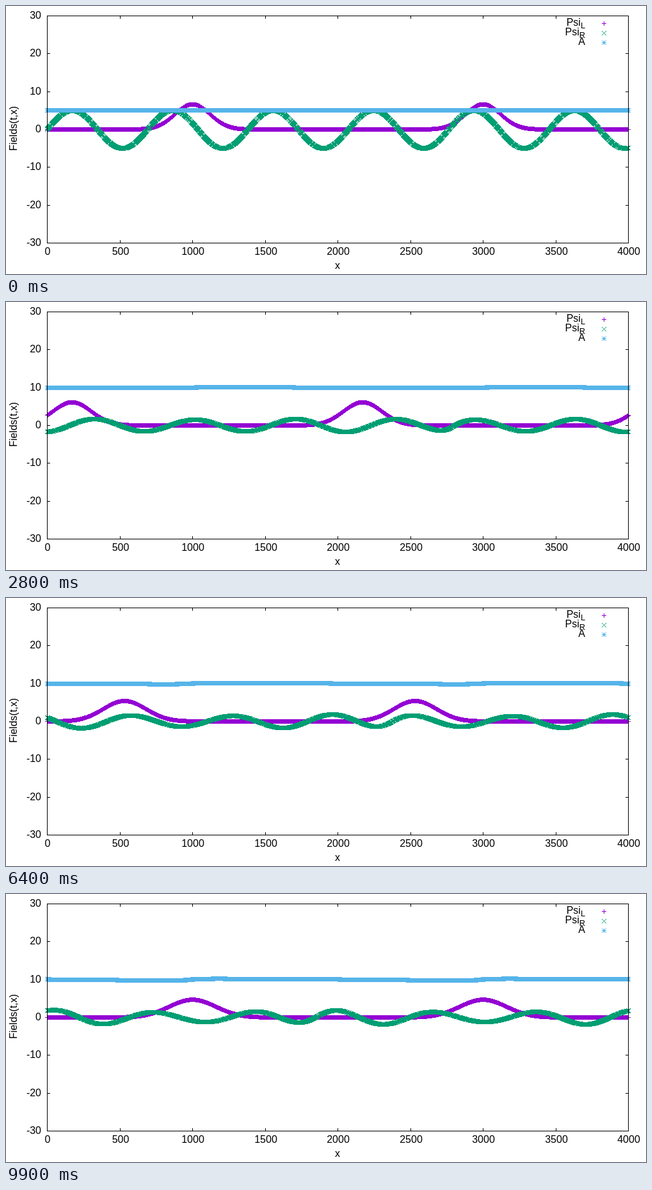
Recreate the animation shown at these times as an HTML page with a canvas. Size 1000 by 420 pixels, loop 10000 ms.

```html
<!DOCTYPE html>
<html lang="en">
<head>
<meta charset="utf-8">
<title>Fields(t,x)</title>
<style>
html, body { margin: 0; width: 100%; height: 100%; overflow: hidden; background: #fff; }
canvas { display: block; width: 1000px; height: 420px; }
</style>
</head>
<body>
<canvas id="plot" width="1000" height="420"></canvas>
<script>
const ctx = document.getElementById('plot').getContext('2d');
const LEFT = 64, RIGHT = 972, TOP = 15, BOTTOM = 371;
const STEP_MS = 100, STEPS = 100;
const PURPLE = '#9400d3', GREEN = '#009e73', BLUE = '#56b4e9';
const FONT = '"Liberation Sans", Arial, sans-serif';

const px = x => Math.round(LEFT + x * (RIGHT - LEFT) / 4000);
const py = y => Math.round((TOP + BOTTOM) / 2 - y * (BOTTOM - TOP) / 60);

// Wraps v into [-period / 2, period / 2).
const wrap = (v, period) => v - period * Math.floor(v / period + 0.5);
const swell = x => Math.cos(2 * Math.PI * (x - 1000) / 2000);

// Pulses running left, slowly spreading.
function psiL(x, n) {
  const sigma = Math.sqrt(14400 + 112 * n);
  const d = wrap(x - 1000 + n * 10000 / 99, 2000);
  const peak = 798 / sigma * (1 - 0.00066 * n * swell(x));
  return peak * Math.exp(-d * d / (2 * sigma * sigma));
}

// Sine running right; its seam at the box edge softens with time.
function psiR(x, n) {
  if (n === 0) return 5 * Math.sin(x / 110);
  const u = wrap(x - 99 * n, 4000);
  const s = Math.sqrt(112 * n);
  const w = 1 / (1 + Math.exp(-1.7 * u / s));
  const wave = (1 - w) * Math.sin((u + 4000) / 110) + w * Math.sin(u / 110);
  const dip = 0.0015 * n * Math.exp(-((u + 80) ** 2) / 28800);
  const c = swell(x);
  return 1.64 * (1 - n * (0.0023 * c + 0.0004 * c * c)) * (1 - dip) * wave;
}

function fieldA(x, n) {
  if (n === 0) return 5;
  const d = wrap(x - 1000, 2000), r = Math.abs(d);
  const shape = (1 - Math.exp(-r / 70)) * (1 - r / 1000);
  const gain = d > 0 ? 0.22 : -0.36;
  return 10 + n * (0.03 / 90 + gain * shape / 99);
}

function plus(x, y) {
  ctx.fillRect(x - 3, y, 7, 1);
  ctx.fillRect(x, y - 3, 1, 7);
}

function cross(x, y) {
  for (let i = -3; i <= 3; i++) {
    ctx.fillRect(x + i, y + i, 1, 1);
    ctx.fillRect(x + i, y - i, 1, 1);
  }
}

function star(x, y) {
  plus(x, y);
  cross(x, y);
}

const series = [
  { field: psiL, mark: plus, color: PURPLE, name: 'Psi', sub: 'L' },
  { field: psiR, mark: cross, color: GREEN, name: 'Psi', sub: 'R' },
  { field: fieldA, mark: star, color: BLUE, name: 'A', sub: '' }
];

function text(str, x, y, align, size = 16) {
  ctx.font = size + 'px ' + FONT;
  ctx.textAlign = align;
  ctx.fillText(str, x, y);
  return ctx.measureText(str).width;
}

function drawAxes() {
  ctx.fillStyle = '#000';
  for (let v = 0; v <= 4000; v += 500) {
    const x = px(v);
    ctx.fillRect(x, TOP, 1, 5);
    ctx.fillRect(x, BOTTOM - 4, 1, 5);
    text(String(v), x + 1, 390, 'center');
  }
  for (let v = -30; v <= 30; v += 10) {
    const y = py(v);
    ctx.fillRect(LEFT, y, 5, 1);
    ctx.fillRect(RIGHT - 4, y, 5, 1);
    text(String(v), 55, y + 5, 'right');
  }
  text('x', 518, 412, 'center');
  ctx.save();
  ctx.translate(17, 192);
  ctx.rotate(-Math.PI / 2);
  text('Fields(t,x)', 0, 0, 'center');
  ctx.restore();
}

function drawSeries(s, n, row) {
  ctx.fillStyle = '#000';
  const y = 27 + 15 * row;
  const subWidth = s.sub ? text(s.sub, 905, y + 8, 'right', 12.8) : 0;
  text(s.name, 905 - subWidth, y + 4, 'right');
  ctx.fillStyle = s.color;
  s.mark(934, y);
  let lastX, lastY;
  for (let x = 0; x <= 4000; x++) {
    const cx = px(x), cy = py(s.field(x, n));
    if (cx !== lastX || cy !== lastY) s.mark(cx, cy);
    lastX = cx;
    lastY = cy;
  }
}

function draw(n) {
  ctx.fillStyle = '#fff';
  ctx.fillRect(0, 0, 1000, 420);
  drawAxes();
  series.forEach((s, row) => drawSeries(s, n, row));
  ctx.strokeStyle = '#000';
  ctx.lineWidth = 1;
  ctx.strokeRect(LEFT + 0.5, TOP + 0.5, RIGHT - LEFT, BOTTOM - TOP);
}

let shown = -1;
const start = performance.now();
function tick() {
  const n = Math.floor((performance.now() - start) / STEP_MS) % STEPS;
  if (n !== shown) draw(shown = n);
  requestAnimationFrame(tick);
}
tick();
</script>
</body>
</html>
```
